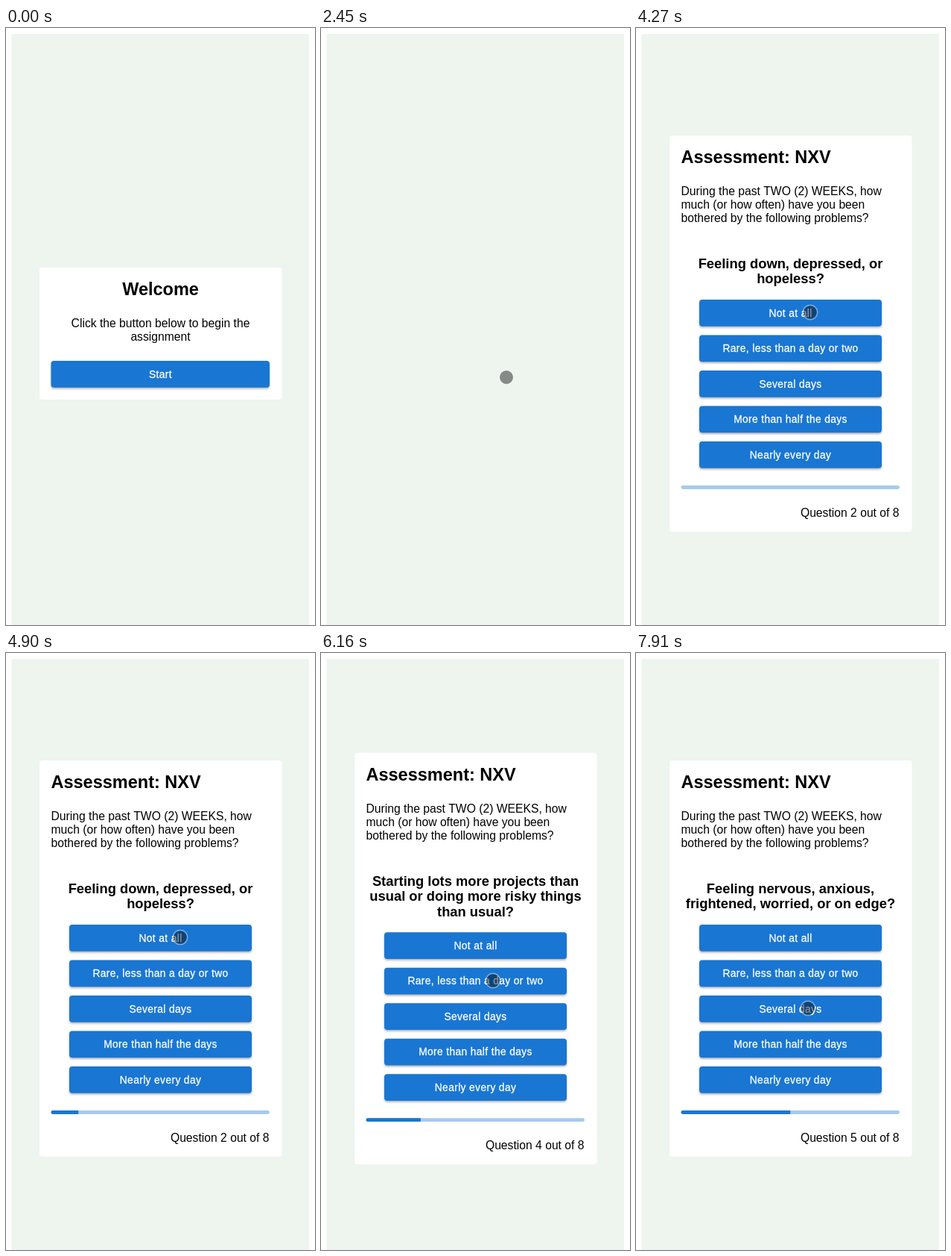
An HTML page with a canvas that plays this animation: 415x800 px, repeating every 8 s.

```html
<!DOCTYPE html>
<html lang="en">
<head>
<meta charset="utf-8">
<title>Questionnaire</title>
<style>
html, body { margin: 0; width: 100%; height: 100%; overflow: hidden; background: #fff; }
canvas { display: block; width: 415px; height: 800px; }
</style>
</head>
<body>
<canvas></canvas>
<script>
const LOOP = 8000, TICK = 70;
const BLUE = '#1976d2', FONT = '"Liberation Sans", Arial, sans-serif';
const CENTER = 207.5, LEFT = 60.5, RIGHT = 354;

const canvas = document.querySelector('canvas');
const ctx = canvas.getContext('2d');
const ratio = window.devicePixelRatio || 1;
canvas.width = 415 * ratio;
canvas.height = 800 * ratio;
ctx.scale(ratio, ratio);

const ANSWERS = ['Not at all', 'Rare, less than a day or two', 'Several days',
  'More than half the days', 'Nearly every day'];
const INTRO = ['During the past TWO (2) WEEKS, how', 'much (or how often) have you been',
  'bothered by the following problems?'];
const QUESTIONS = [
  { start: 2660, lines: ['Little interest or pleasure in', 'doing things?'] },
  { start: 4270, lines: ['Feeling down, depressed, or', 'hopeless?'] },
  { start: 5460, lines: ['Sleeping less than usual, but still', 'have a lot of energy?'] },
  { start: 6160, lines: ['Starting lots more projects than', 'usual or doing more risky things', 'than usual?'] },
  { start: 7420, lines: ['Feeling nervous, anxious,', 'frightened, worried, or on edge?'] },
];
const WELCOME_END = 2240;
const CLICKS = [1680, 3640, 5110, 5670, 7100];

// Pointer stops: time, x, y
const PATH = [[700, 403, 622], [1470, 249, 468], [2590, 249, 468], [3010, 236, 382],
  [3360, 234, 378], [3570, 234, 381], [5320, 234, 381], [5600, 231, 439],
  [6230, 231, 439], [6790, 235, 390], [7420, 235, 390], [7840, 231, 476]];

const clamp = v => Math.min(1, Math.max(0, v));
const smooth = v => v * v * (3 - 2 * v);

function pointerAt(t) {
  const next = PATH.findIndex(p => p[0] > t);
  if (next < 0) return PATH[PATH.length - 1].slice(1);
  const [t0, x0, y0] = PATH[Math.max(0, next - 1)], [t1, x1, y1] = PATH[next];
  const k = smooth(clamp((t - t0) / (t1 - t0 || 1)));
  return [x0 + (x1 - x0) * k, y0 + (y1 - y0) * k];
}

function box(x, y, w, h, r, color) {
  ctx.beginPath();
  ctx.roundRect(x, y, w, h, r);
  ctx.fillStyle = color;
  ctx.fill();
}

function disc(x, y, r, color) {
  ctx.beginPath();
  ctx.arc(x, y, r, 0, Math.PI * 2);
  ctx.fillStyle = color;
  ctx.fill();
}

function text(str, x, y, size, align = 'left', weight = 'normal', color = '#000') {
  ctx.font = `${weight} ${size}px ${FONT}`;
  ctx.textAlign = align;
  ctx.fillStyle = color;
  ctx.fillText(str, x, y);
}

function ripple(t, x, y, w, h) {
  for (const click of CLICKS) {
    const age = t - click + TICK;
    if (age <= 0 || age > 450) continue;
    const [px, py] = pointerAt(click);
    if (px < x || px > x + w || py < y || py > y + h) continue;
    ctx.save();
    ctx.beginPath();
    ctx.roundRect(x, y, w, h, 4);
    ctx.clip();
    const alpha = 0.3 * (1 - clamp((age - 150) / 300));
    disc(px, py, w * (1 - (1 - clamp(age / 400)) ** 2), `rgba(255,255,255,${alpha})`);
    ctx.restore();
  }
}

function button(label, x, y, w, t) {
  const h = 35.8;
  ctx.save();
  ctx.shadowColor = 'rgba(0,0,0,.32)';
  ctx.shadowBlur = 3 * ratio;
  ctx.shadowOffsetY = 1.7 * ratio;
  box(x, y, w, h, 4, BLUE);
  ctx.restore();
  ripple(t, x, y, w, h);
  ctx.save();
  ctx.letterSpacing = '0.39px';
  text(label, CENTER, y + 22.7, 13.75, 'center', 'normal', '#fff');
  ctx.strokeStyle = '#fff';
  ctx.lineWidth = 0.3;
  ctx.strokeText(label, CENTER, y + 22.7);
  ctx.restore();
}

function card(top, bottom) {
  box(45, top, 325.5, bottom - top, 4, '#fff');
}

function welcome(t) {
  card(321, 498);
  text('Welcome', CENTER, 358, 23.5, 'center', 'bold');
  text('Click the button below to begin the', CENTER, 401, 15.7, 'center');
  text('assignment', CENTER, 419, 15.7, 'center');
  button('Start', LEFT, 446, RIGHT - LEFT, t);
}

function assessment(index, t) {
  const { start, lines } = QUESTIONS[index];
  const grow = lines.length > 2 ? 10.2 : 0;
  card(144 - grow, 675 + grow);
  text('Assessment: NXV', LEFT, 181.3 - grow, 23.5, 'left', 'bold');
  INTRO.forEach((line, i) => text(line, LEFT, 224 - grow + i * 18, 15.7));
  lines.forEach((line, i) => text(line, CENTER, 321.8 - grow + i * 20.6, 18.35, 'center', 'bold'));
  ANSWERS.forEach((label, i) => button(label, 85, 364 + grow + i * 47.5, 245, t));

  const width = RIGHT - LEFT, barTop = 613 + grow;
  const done = Math.max(0, index - 1 + clamp((t - start) / 400)) / 8;
  box(LEFT, barTop, width, 4.9, 2.4, '#a7caed');
  if (done) box(LEFT, barTop, width * done, 4.9, [2.4, 0, 0, 2.4], BLUE);
  text(`Question ${index + 1} out of 8`, RIGHT - 0.5, 655 + grow, 15.7, 'right');
}

function pointer(t) {
  if (t < PATH[0][0]) return;
  const [x, y] = pointerAt(t);
  disc(x, y, 9.2, 'rgba(0,0,0,.43)');
  ctx.beginPath();
  ctx.arc(x, y, 9.7, 0, Math.PI * 2);
  ctx.strokeStyle = 'rgba(255,255,255,.4)';
  ctx.lineWidth = 1.7;
  ctx.stroke();
}

function draw(now) {
  const t = Math.floor((now % LOOP) / TICK) * TICK;
  box(0, 0, 415, 800, 0, '#fff');
  box(7.4, 8, 399.6, 792, 0, '#edf5ee');
  const index = QUESTIONS.filter(q => q.start <= t).length - 1;
  if (t < WELCOME_END) welcome(t);
  else if (index >= 0) assessment(index, t);
  pointer(t);
}

function frame() {
  draw(performance.now());
  requestAnimationFrame(frame);
}
frame();
</script>
</body>
</html>
```
